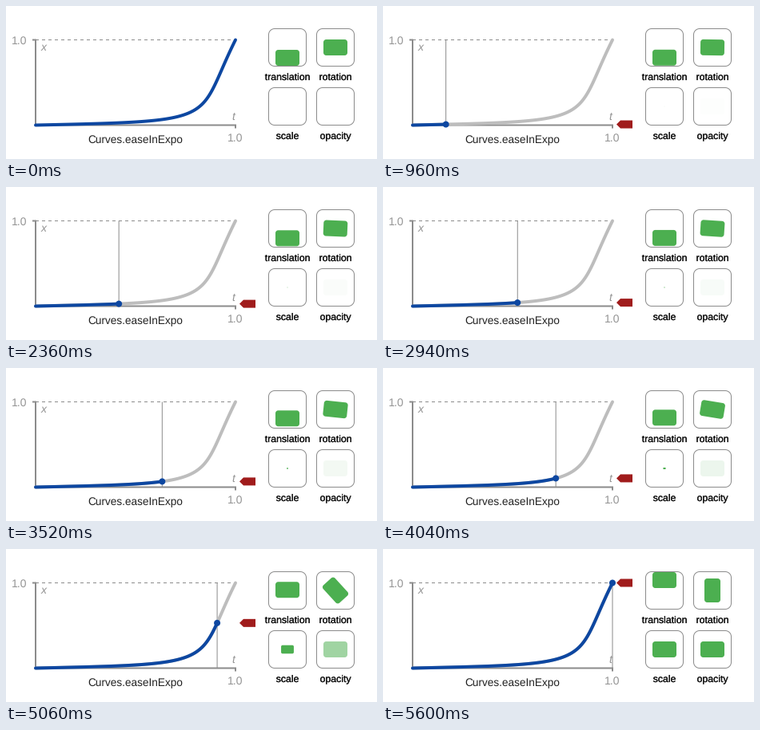
A matplotlib script that plays this animation: 464 by 192 pixels, repeating every 5620 ms.

```python
import numpy as np
import matplotlib.pyplot as plt
from matplotlib import patheffects
from matplotlib.animation import FuncAnimation
from matplotlib.patches import Circle, Polygon
from matplotlib.transforms import Affine2D

W, H, DPI = 464, 192, 64
PX = 72 / DPI
TICK, LOOP = 20, 5620
STEPS = 120
LEFT, RIGHT, TOP, BOTTOM = 37, 287, 42.5, 149.5

BLUE, GREEN, RED = "#0D47A1", "#4CAF50", "#A01C1C"
AXIS, TRACK, LABEL = "#8C8C8C", "#BDBDBD", "#949494"

plt.rcParams["font.family"] = "Liberation Sans"
plt.rcParams["text.hinting"] = "none"
plt.rcParams["path.simplify"] = False
plt.rcParams["path.snap"] = False


def bezier(p1, p2, m):
    return 3 * p1 * (1 - m) ** 2 * m + 3 * p2 * (1 - m) * m**2 + m**3


M = np.linspace(0, 1, 2001)
CURVE_T = bezier(0.95, 0.795, M)
CURVE_V = bezier(0.05, 0.035, M)


def ease_in_expo(t):
    return np.interp(t, CURVE_T, CURVE_V)


def to_px(t, v):
    return LEFT + t * (RIGHT - LEFT), BOTTOM - v * (BOTTOM - TOP)


fig = plt.figure(figsize=(W / DPI, H / DPI), dpi=DPI, facecolor="white")
ax = fig.add_axes([0, 0, 1, 1])
ax.set_xlim(0, W)
ax.set_ylim(H, 0)
ax.axis("off")


def line(xs, ys, color, width, z, cap="butt"):
    return ax.plot(xs, ys, color=color, lw=width * PX, zorder=z,
                   solid_capstyle=cap, solid_joinstyle="miter")[0]


def text(x, y, s, size, color, ha="center", weight=0, **kw):
    t = ax.text(x, y, s, fontsize=size * PX, color=color, ha=ha,
                va="baseline", **kw)
    if weight:
        t.set_path_effects([patheffects.withStroke(
            linewidth=weight * PX, foreground=color)])


def rounded(cx, cy, w, h, r, **kw):
    """Rectangle with circular corners around a centre."""
    a = np.radians(np.linspace(0, 360, 64, endpoint=False) + 360 / 128)
    c, s = np.cos(a), np.sin(a)
    xs = cx + np.sign(c) * (w / 2 - r) + r * c
    ys = cy + np.sign(s) * (h / 2 - r) + r * s
    return ax.add_patch(Polygon(np.column_stack([xs, ys]), **kw))


def tile(cx, cy, name):
    rounded(cx, cy, 47, 47, 7.5, fc="none", ec=AXIS, lw=PX, zorder=1)
    text(cx, cy + 41, name, 12.3, "#111111", weight=0.2)
    block = rounded(0, 0, 30, 20, 3.5, fc=GREEN, ec="none", zorder=2)

    def place(dy=0.0, angle=0.0, scale=1.0):
        move = Affine2D().scale(scale).rotate_deg(angle).translate(cx, cy + dy)
        block.set_transform(move + ax.transData)

    place()
    return block, place


# Graph
line([LEFT - 4, LEFT, LEFT, RIGHT, RIGHT],
     [TOP, TOP, BOTTOM, BOTTOM, BOTTOM + 4], AXIS, 2, 1)
ax.plot([LEFT, RIGHT], [TOP, TOP], color=AXIS, lw=PX, zorder=1,
        dashes=(4, 4), dash_capstyle="butt")
track = line(*to_px(CURVE_T, CURVE_V), TRACK, 4, 3, "round")
cursor = line([], [], AXIS, 1, 2)
done = line([], [], BLUE, 4, 4, "round")
dot = ax.add_patch(Circle((0, 0), 4, fc=BLUE, ec="none", zorder=5))
marker = ax.add_patch(Polygon([(0, 0)] * 5, fc=RED, ec="none", zorder=5))

text(26.5, 47.5, "1.0", 14, LABEL, "right")
text(287, 169.5, "1.0", 14, LABEL)
text(47, 55.5, "x", 14, LABEL, style="italic")
text(284.3, 143, "t", 14, LABEL, style="italic")
text(162, 172, "Curves.easeInExpo", 13.6, "#212121")

# Sample tiles
_, slide = tile(352, 52, "translation")
_, turn = tile(412, 52, "rotation")
_, grow = tile(352, 126, "scale")
fader, _ = tile(412, 126, "opacity")


def step_at(ms):
    """Steps last 20, 100 and 20 ms in turn."""
    cycle, phase = divmod(ms, 140)
    return 3 * cycle + (phase >= 20) + (phase >= 120)


def update(i):
    step = step_at(i * TICK)
    t = step / STEPS
    v = float(ease_in_expo(t))
    x, y = to_px(t, v)

    running = step > 0
    for part in (track, cursor, dot, marker):
        part.set_visible(running)

    ts = np.linspace(0, t if running else 1, 300)
    done.set_data(*to_px(ts, ease_in_expo(ts)))
    cursor.set_data([x, x], [TOP, BOTTOM])
    dot.center = x, y
    marker.set_xy([(292, y), (297, y - 5), (312, y - 5),
                   (312, y + 5), (297, y + 5)])

    slide(dy=13 - 26 * v)
    turn(angle=90 * v)
    grow(scale=max(v, 1e-4))
    fader.set_alpha(v)
    return ()


anim = FuncAnimation(fig, update, frames=LOOP // TICK, interval=TICK,
                     init_func=lambda: update(0), repeat=True,
                     repeat_delay=0, blit=False)
plt.show()
```
